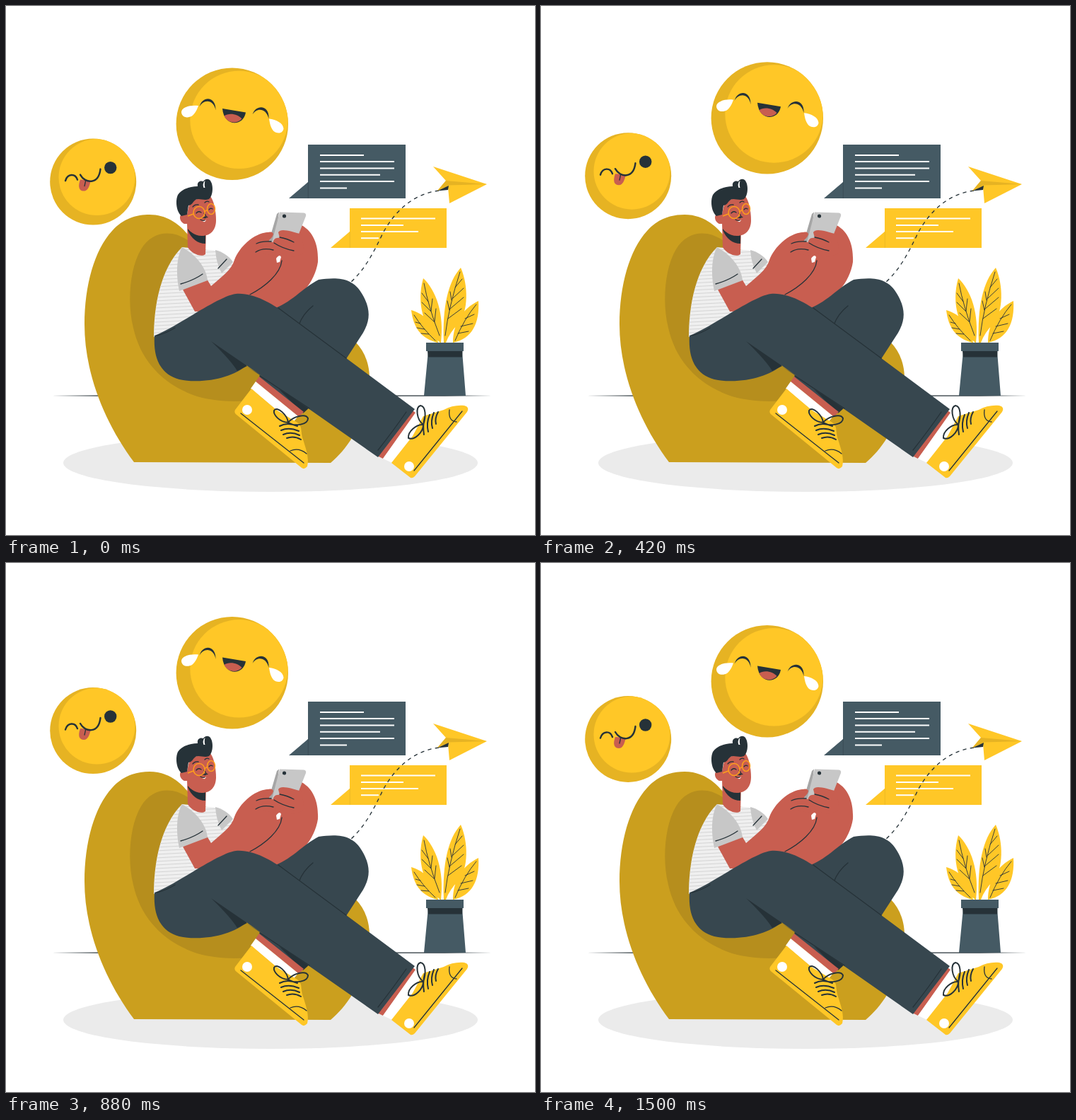
These frames come from a looping animation (748 px wide and 748 px high, 1.54 s). An HTML page:

```html
<!DOCTYPE html>
<html lang="en">
<head>
<meta charset="utf-8">
<title>Chatting on a bean bag</title>
<style>
  html, body { margin: 0; width: 100%; height: 100%; overflow: hidden; background: #fff; }
  svg { display: block; width: 100vw; height: 100vh; }
  .yellow { fill: #ffc727; }
  .shade { fill: #e6b323; }
  .slate { fill: #455a64; }
  .pants { fill: #37474f; }
  .ink { fill: #263238; }
  .skin { fill: #c85e50; }
  .white { fill: #fff; }
  .line { fill: none; stroke: #263238; stroke-width: 1.3; stroke-linecap: round; stroke-linejoin: round; }
  .thin { stroke-width: .9; }
  .lace { stroke-width: 2; }
  .smile { stroke-width: 2.4; }
  .text { fill: none; stroke: #fff; stroke-width: 2; }
</style>
</head>
<body>
<svg viewBox="0 0 748 748">
  <defs>
    <pattern id="stripes" width="20" height="5" patternUnits="userSpaceOnUse" patternTransform="rotate(-3)">
      <path d="M0 2.5H20" stroke="#d6d6d6" stroke-width="1.2"/>
    </pattern>
    <clipPath id="bigBall"><circle cx="319.8" cy="167.2" r="79.2"/></clipPath>
    <clipPath id="smallBall"><circle cx="123.2" cy="249" r="61"/></clipPath>
  </defs>

  <ellipse cx="374" cy="646" rx="293" ry="41" fill="#ebebeb"/>
  <path class="ink" d="M64 551L130 550.400H620L688 551L620 551.700H130Z"/>

  <g id="plant">
    <path class="yellow" d="M614 476C590 455 580 420 590 385C608 402 620 435 615 476Z
      M619 476C617 425 625 390 643 370C654 395 654 432 640 449Q627 462 622 476Z
      M610 476C587 470 576 455 573 430C594 436 606 452 611 476Z
      M632 476C632 450 645 428 668 417C670 448 659 471 632 476Z"/>
    <path class="line thin" d="M591 392Q597 425 613 466M642 376Q626 425 621 466M577 437Q589 456 607 473M665 422Q648 442 635 473
      M597 418L588 406M601 432L588 419M606 447L592 434M601 431L603 414M606 446L608 428
      M635 398L645 386M631 414L647 399M627 429L647 412M625 442L644 428M630 416L628 404M627 430L624 417
      M586 449L579 447M592 457L581 455M598 464L587 463M649 442L662 436M643 453L660 449M639 463L654 460"/>
    <path class="slate" d="M594 476H647V488H594ZM597 488H645L650 551H591Z"/>
    <path class="ink" d="M596 488H645.500L645 496.500H597Z"/>
  </g>

  <g id="messages">
    <path class="slate" d="M427 196H565V272H400L427 249Z"/>
    <path d="M427.300 249V272" stroke="#37474f" stroke-width=".7"/>
    <path class="text" d="M444 211H506M444 220H549M444 229.500H549M444 238.700H529M444 248H549M444 257.500H482"/>
    <path class="yellow" d="M486 286H623V342H459L486 319Z"/>
    <path d="M486.300 319V342" stroke="#e6b323" stroke-width=".7"/>
    <path class="text" d="M502 300.500H607M502 310H562M502 319H583M502 328.300H527"/>
  </g>

  <g id="plane">
    <path class="line" style="stroke-linecap:butt" stroke-dasharray="5.3" d="M612 261C575 266 550 290 533 321C520 348 508 372 487 391"/>
    <path class="yellow" d="M604 227L680 252L627 279L625 256L610 261L622 247Z"/>
    <path class="shade" d="M622 247L680 252L626 253.500L610 261.500Z"/>
    <path class="ink" d="M610 261.500L626 254L625 260Z"/>
  </g>

  <g id="chair">
    <path fill="#cb9f1e" d="M181 645C140 590 111 520 111 450C111 395 125 345 150 318C166 300 185 295 203 295C232 295 252 314 264 333L494 475C507 488 514 506 514 527C510 585 487 622 459 646Z"/>
    <path fill="#b68e1d" d="M258 332C236 316 207 317 191 344C175 370 171 420 180 455C190 500 220 535 270 552C295 559 320 560 342 558L370 500Z"/>
  </g>

  <g id="torso">
    <path id="shirt" fill="#f0f0f0" d="M249 341L298 346L320 362L330 412L209 468C209 425 218 372 249 341Z"/>
    <path fill="url(#stripes)" d="M249 341L298 346L320 362L330 412L209 468C209 425 218 372 249 341Z"/>
    <path fill="#c7c7c7" d="M296 345C305 347 315 353 321 362L305 378Q297 363 296 345Z"/>
    <path class="line" d="M300 371L312 358"/>
    <path class="skin" d="M256 306L257 341C262 350 276 356 282 351L283 318Z"/>
    <path class="ink" d="M257 315C263 323 274 325 282 322V336C271 336 262 329 257 317Z"/>
  </g>

  <g id="head">
    <path class="skin" d="M256 294C244 290 243 304 252 308L257 308C257 318 266 325 277 325C290 325 297 316 297 303C297 290 294 274 288 268L260 276Z"/>
    <path class="ink" d="M248 297C241 291 239 276 243 267C248 260 258 255 271 255C270 249 274 246 279 248C281 244 288 243 290 249C293 254 293 268 287 273C280 276 273 271 268 274C263 278 264 281 258 282L256 295Z"/>
    <path class="white" d="M279.500 257Q277 250 281.500 247Q280 253 281.500 257Z"/>
    <path class="line" d="M264 284Q267 280 272 281M281 278Q284 275 287 277M269 293Q272 289 276 292M287 288Q289 285 292 287M280 293Q285 298 281 300M275 302Q278 304 281 303"/>
    <path class="ink" d="M277 300Q283 295 286 299Z"/>
    <path class="white" d="M277 304Q281 305 283 302Q282 307 277 304Z"/>
    <g fill="none" stroke="#ff9f1c" stroke-width="1.500">
      <ellipse cx="273" cy="292" rx="8" ry="8.500"/>
      <ellipse cx="290" cy="287" rx="5.500" ry="7.500"/>
      <path d="M257 297L265 294M281 291Q283 288 285 289"/>
    </g>
  </g>

  <g id="arms">
    <path class="skin" d="M250 401L284 386L290 396C306 382 319 373 323 359C329 342 350 321 370 320L380 324L418 310C436 320 442 340 441 362C437 390 414 420 378 430L267 432Z"/>
    <path fill="#c7c7c7" d="M249 341C241 355 240 380 245 403L285 388C283 370 270 353 249 341Z"/>
    <path class="line" d="M247 393Q265 388 278 379"/>
    <path fill="#a6a6a6" d="M386 291.500L383 294L371 335L380 339Z"/>
    <path fill="#c7c7c7" d="M387 291.500L421 292.500Q425 293 424 297L411 330L375 338Z"/>
    <circle class="ink" cx="393.500" cy="297" r="2.600"/>
    <path class="skin" d="M366 321Q378 317 378 323Q376 329 370 332L384 336L381 353L360 350ZM385 320C388 314 402 318 418 323L422 350L407 355C395 354 378 345 378 338C376 330 382 327 387 328Z"/>
    <path class="white" d="M382 357Q387 350 389 355L387 362L383 363Z"/>
    <path class="line" d="M354 336Q362 332 375 333M353 348Q363 341 378 345M387 327Q398 329 407 334M379 335Q391 343 407 346M390 360C388 379 366 397 345 408"/>
  </g>

  <g id="farLeg">
    <path class="pants" d="M376 429C402 421 420 398 442 387C465 384 490 382 504 408C516 429 515 444 505 462L481 499L440 490Z"/>
    <path class="line" d="M434 424Q420 435 414 451"/>
    <path class="pants" d="M341 510L359 522L357 528L415 576L432 566Z"/>
    <path class="ink" d="M386 542L430 567L420 576Z"/>
    <path class="skin" d="M358 524L353 531L414 581L421 574Z"/>
    <path class="white" d="M353 531L346 541L405 590L413 580Z"/>
    <path class="yellow" d="M347 541L324 571Q322 575 326 578L418 653Q422 656 426 651C429 639 424 626 420 613C416 601 420 596 412 589L382 571Z"/>
    <circle class="white" cx="341" cy="571" r="7"/>
    <path class="line" d="M332 576L421 646M402 629Q414 624 425 633"/>
    <path class="line lace" d="M399 589C386 588 378 578 379 572C384 565 398 579 399 589C406 580 424 576 427 583C427 592 409 595 399 589
      M387 594Q398 588 412 594M389 600Q400 595 414 601M392 606Q403 601 415 607M397 611Q407 607 417 613"/>
  </g>

  <g id="nearLeg">
    <path class="skin" d="M572 570L579 575L533 640L525 636Z"/>
    <path class="white" d="M579 576L580 608L546 646L533 640Z"/>
    <path class="yellow" d="M545 646L572 667Q575 668 578 665L652 574Q656 567 648 565C638 564 628 566 619 571L590 580L575 608Z"/>
    <circle class="white" cx="570" cy="651" r="7"/>
    <path class="line" d="M577 657L645 573M627 571Q625 587 637 588"/>
    <path class="line lace" d="M590 592C580 584 579 567 586 565C594 566 594 581 590 592C580 591 568 602 569 611C578 615 590 602 590 592
      M592 581Q589 594 591 606M599 578Q594 590 597 602M605 575Q600 587 603 597M611 574Q606 583 608 591"/>
    <path class="pants" d="M210 466C240 455 300 410 325 407C350 405 374 420 395 434L578 570L526 638L340 508C322 525 280 535 245 528C219 521 208 499 210 466Z"/>
    <path class="ink" d="M290 474L341 509L327 516Q318 501 290 474Z"/>
    <path class="line" d="M385 427L481 498M213 466Q226 463 239 455M566 574Q548 600 526 628M359 523L429 569"/>
  </g>

  <g id="emojis">
    <circle class="shade" cx="319.800" cy="167.200" r="79.200"/>
    <circle class="yellow" cx="329.500" cy="161.300" r="69.200" clip-path="url(#bigBall)"/>
    <path class="ink" d="M273.500 143C277 127.500 297 127 296.500 148C294 132 279 131.500 273.500 143ZM348.500 154C353 139 373 140 371.500 160C368 144 354 144 348.500 154Z"/>
    <path class="ink" d="M306 145.500L339 151C336 171 308 172 306 145.500Z"/>
    <path class="skin" d="M308.500 156C315 151 328 153 333.500 160C326 168 313 166 308.500 156Z"/>
    <path class="white" d="M272 141.500C262 140 248 143 248 151C249 159 258 159 263 156C268 152 270 147 272 141.500ZM372 160C382 161 392 166 392.500 174C391 182 382 181 378 177C374 172 373 166 372 160Z"/>

    <circle class="shade" cx="123.200" cy="249" r="61"/>
    <circle class="yellow" cx="128.500" cy="242.500" r="54" clip-path="url(#smallBall)"/>
    <path class="skin" d="M105 246C101 257 104 262 110 262C116 262 118 255 120 247Z"/>
    <path class="line smile" d="M84 247.500C87 237 98 237 101 246M105 239C112 252 131 253 133.500 231"/>
    <path class="line" d="M112.500 248L111 255"/>
    <circle class="ink" cx="147.700" cy="229" r="8.700"/>
  </g>
</svg>
<script>
  const LOOP = 1540, PERIOD = 1500, LEAD = 20, LIFT = 15;
  const emojis = document.getElementById('emojis');

  // Linear float: up for half a period, then back down.
  function draw() {
    const time = Math.min(performance.now() % LOOP + LEAD, PERIOD);
    const rise = 1 - Math.abs(2 * time / PERIOD - 1);
    emojis.setAttribute('transform', `translate(0 ${-LIFT * rise})`);
    requestAnimationFrame(draw);
  }
  draw();
</script>
</body>
</html>
```
